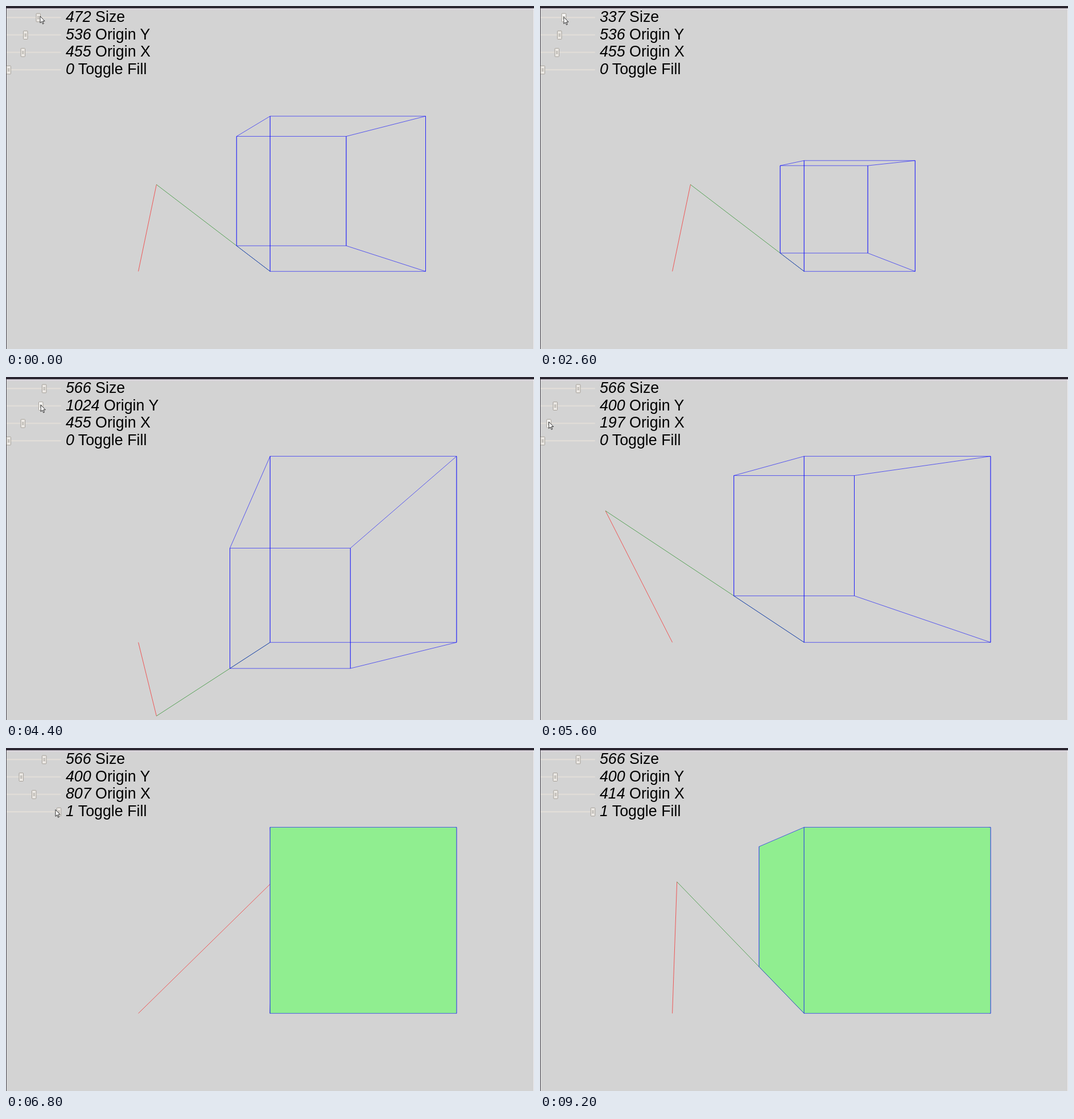
These frames come from a looping animation (928x604 px, 9800 ms). An HTML page:

```html
<!DOCTYPE html>
<html lang="en">
<head>
<meta charset="utf-8">
<title>Cube in perspective</title>
<style>
html, body { margin: 0; width: 100%; height: 100%; overflow: hidden; background: #d3d3d3; }
svg { display: block; width: 928px; height: 604px; }
text { font: 26.8px "Liberation Sans", Arial, sans-serif; fill: #000; white-space: pre; }
.value { font-style: italic; }
.line { fill: none; stroke-width: .6; }
.face { stroke: #00f; stroke-width: .6; }
</style>
</head>
<body>
<svg viewBox="0 0 928 604">
  <defs>
    <linearGradient id="shade" x2="0" y2="1">
      <stop offset="0" stop-color="#d9d2db"/>
      <stop offset="1" stop-color="#d3d3d3"/>
    </linearGradient>
  </defs>
  <rect width="928" height="604" fill="#d3d3d3"/>
  <rect y="4" width="928" height="5" fill="url(#shade)"/>
  <rect x="927" y="4" width="1" height="600" fill="#efedf0"/>
  <rect y="4" width="1" height="600" fill="#4b4850"/>
  <rect width="928" height="4" fill="#2b2631"/>
  <g id="scene"></g>
  <g id="panel"></g>
  <path id="cursor" d="M0 0V11.8L2.7 9.2L4.6 13.7L6.3 12.9L4.5 8.6H8.1Z" fill="#fff" stroke="#000" stroke-width=".8"/>
</svg>
<script>
const LOOP = 9800, STEP = 200, GLIDE = 400;
const SCALE = 0.579, LEFT = 1, TOP = 4.1;
const BASE = 800, DEPTH = 1600, ROW = 30.7;
const ENTRY = [60, 18], EXIT = [19, 450], EXIT_TIME = 9000;
const SIZE = 0, ORIGIN_Y = 1, ORIGIN_X = 2, FILL = 3;

const move = (row, start, end, to) => ({ row, start, end, to });
const moves = [
  move(SIZE, 500, 1000, 472),
  move(SIZE, 1000, 2100, 107),
  move(SIZE, 2200, 3000, 566),
  move(ORIGIN_Y, 3400, 4000, 1363),
  move(ORIGIN_Y, 4000, 5000, 400),
  move(ORIGIN_X, 5200, 5600, 197),
  move(ORIGIN_X, 5600, 6400, 807),
  move(FILL, 6600, 6800, 1),
  move(ORIGIN_X, 7800, 8600, 414)
];

const mix = (a, b, p) => a + (b - a) * p;

function ease(t, start, end) {
  const p = Math.min(1, Math.max(0, (t - start) / (end - start)));
  return p * p * (3 - 2 * p);
}

function set(el, attrs) {
  for (const name in attrs) el.setAttribute(name, attrs[name]);
}
function add(parent, tag, attrs = {}) {
  const el = document.createElementNS("http://www.w3.org/2000/svg", tag);
  set(el, attrs);
  parent.appendChild(el);
  return el;
}

const scene = document.getElementById("scene");
const panel = document.getElementById("panel");
const cursor = document.getElementById("cursor");

const red = add(scene, "path", { class: "line", stroke: "#f00" });
const green = add(scene, "path", { class: "line", stroke: "#008000" });
const faces = Array.from({ length: 4 }, () => add(scene, "path", { class: "face" }));

function makeSlider(row, label, max, initial, grip = 0) {
  const y = 20.5 + row * ROW;
  add(panel, "rect", { x: 1, y: y - 1.5, width: 96, height: 2.4, rx: 1, fill: "#e1ddd8" });
  const thumb = add(panel, "g");
  const body = add(thumb, "rect", {
    x: -3.7, y: -7.3, width: 7.4, height: 14.6, rx: 1, stroke: "#a09a92", "stroke-width": .9
  });
  for (const dy of [-2, 0, 2])
    add(thumb, "path", { d: `M-1.8 ${dy}h3.6`, stroke: "#8f8982", "stroke-width": .8 });
  const text = add(panel, "text", { x: 104.9, y: 27.9 + row * ROW });
  const value = add(text, "tspan", { class: "value" });
  add(text, "tspan").textContent = " " + label;

  const thumbX = v => 4.7 + 88.3 * v / max;
  const steps = moves.filter(m => m.row === row);
  return {
    valueAt: t => Math.round(steps.reduce((v, m) => mix(v, m.to, ease(t, m.start, m.end)), initial)),
    // The pointer grips each lower slider a little higher.
    gripAt: v => [thumbX(v) + grip, y - 1 - row],
    show(v, [cx, cy]) {
      const x = thumbX(v);
      const hover = Math.abs(cx - x) < 3 && Math.abs(cy - y) < 8;
      set(thumb, { transform: `translate(${x} ${y})` });
      set(body, { fill: hover ? "#faf9f7" : "#ece9e5" });
      value.textContent = v;
    }
  };
}

const sliders = [
  makeSlider(SIZE, "Size", 800, 472),
  makeSlider(ORIGIN_Y, "Origin Y", 1600, 536),
  makeSlider(ORIGIN_X, "Origin X", 1600, 455),
  makeSlider(FILL, "Toggle Fill", 1, 0, -6)
];

// Follow the dragged thumb, then glide to the next one.
function cursorAt(t, values) {
  const grip = m => sliders[m.row].gripAt(values[m.row]);
  const last = moves.filter(m => m.start <= t).pop();
  const next = moves.find(m => m.start > t);
  const from = last ? grip(last) : ENTRY;
  const to = next ? grip(next) : EXIT;
  const arrive = next ? next.start : EXIT_TIME;
  const leave = Math.max(arrive - GLIDE, last ? last.end : 0);
  const p = ease(t, leave, arrive);
  return from.map((a, i) => mix(a, to[i], p));
}

const point = (x, y) => [LEFT + x * SCALE, TOP + y * SCALE];
const path = points => "M" + points.map(p => p.join(" ")).join("L");

function square(x, y, side) {
  return [point(x, y), point(x + side, y), point(x + side, y - side), point(x, y - side)];
}

function drawCube([size, oy, ox, filled]) {
  const k = size / DEPTH;
  const front = square(BASE, BASE, size);
  const back = square(mix(BASE, ox, k), mix(BASE, oy, k), size * (1 - k));
  const right = [front[1], back[1], back[2], front[2]];
  const left = [front[0], back[0], back[3], front[3]];
  const origin = point(ox, oy);

  set(red, { d: path([point(BASE / 2, BASE), origin]) });
  set(green, { d: path([origin, front[0]]) });
  [back, right, left, front].forEach((points, i) =>
    set(faces[i], { d: path(points) + "Z", fill: filled ? "#90ee90" : "none" }));
}

function draw(time) {
  const t = Math.floor(time % LOOP / STEP) * STEP;
  const values = sliders.map(s => s.valueAt(t));
  const tip = cursorAt(t, values);

  drawCube(values);
  sliders.forEach((s, i) => s.show(values[i], tip));
  set(cursor, {
    transform: `translate(${tip.join(" ")})`,
    visibility: t <= EXIT_TIME ? "visible" : "hidden"
  });
}

const start = performance.now();
function tick() {
  draw(performance.now() - start);
  requestAnimationFrame(tick);
}
tick();
</script>
</body>
</html>
```
